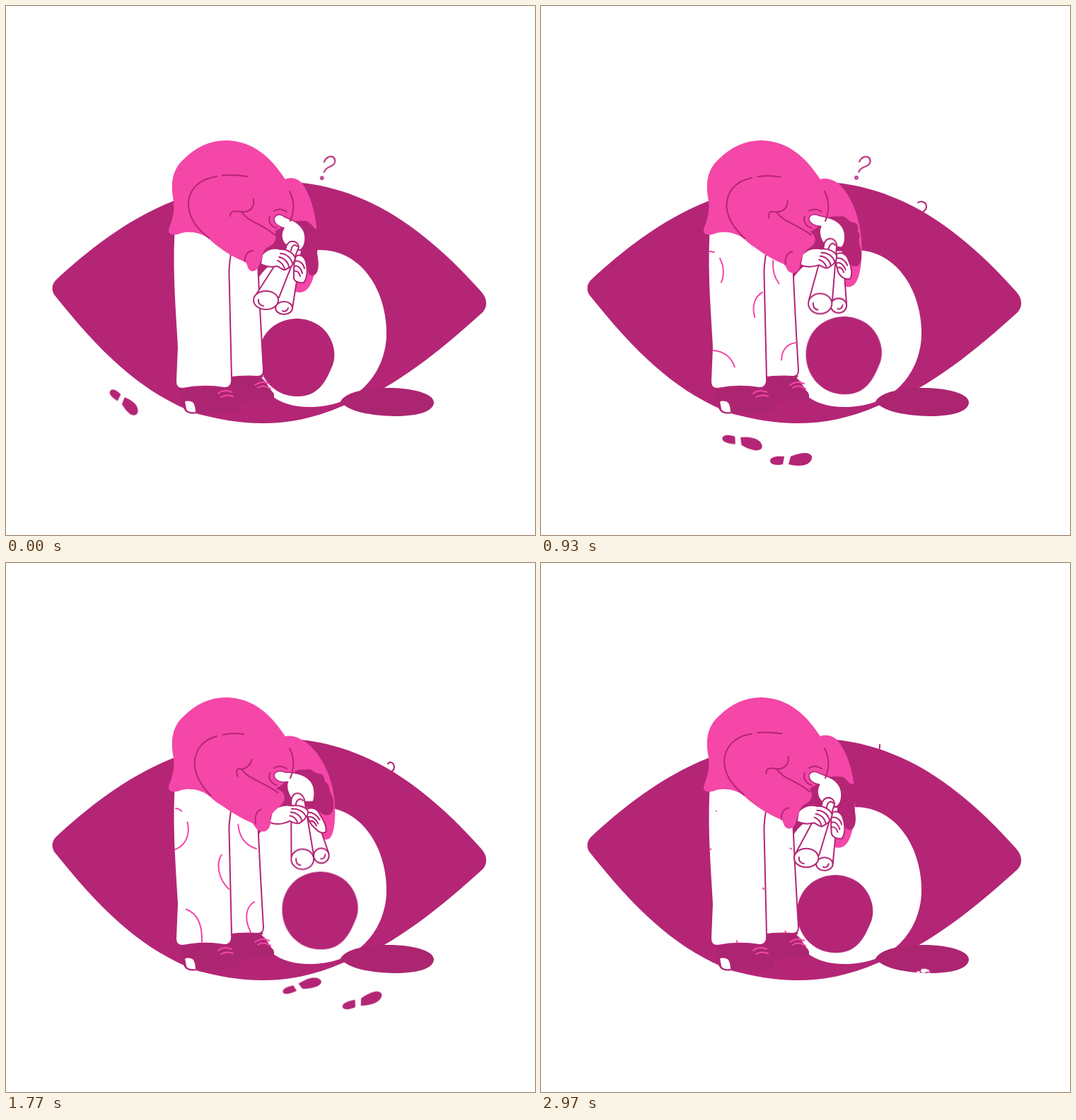
Recreate the animation shown at these times as an HTML page. Size 748 by 748 pixels, loop 3010 ms.

```html
<!DOCTYPE html>
<html lang="en">
<head>
<meta charset="utf-8">
<title>Searching eye</title>
<style>
:root { --dark: #b42576; --deep: #ac2571; --pink: #f447a8; --loop: 3010ms linear infinite; }
html, body { margin: 0; width: 100%; height: 100%; overflow: hidden; background: #fff; }
svg { display: block; width: 100vw; height: 100vh; }

.dark { fill: var(--dark); }
.deep { fill: var(--deep); }
.pink { fill: var(--pink); }
.white { fill: #fff; }
.ink { stroke: var(--dark); }
.line { fill: none; stroke: var(--dark); }
.lace { fill: none; stroke: var(--pink); }
svg { stroke-width: 2; stroke-linecap: round; stroke-linejoin: round; }

/* Parts that follow the gaze blend between two outlines */
.morph { d: var(--a); animation: morph var(--loop); }
@keyframes morph { 0%, 100% { d: var(--a); } 74%, 89% { d: var(--b); } }

.pupil { animation: look var(--loop); }
@keyframes look { 0%, 100% { transform: none; } 74%, 89% { transform: translate(42px, -7px); } }

.swing { transform-origin: 0 335px; animation: swing var(--loop); }
@keyframes swing {
  0%, 74%, 89%, 100% { transform: none; }
  15%, 42% { transform: scaleY(1.06); }
  59% { transform: scaleY(1.035); }
  96% { transform: scaleY(1.035); }
}

.crease { stroke-dasharray: 1 3; animation: trace var(--loop); }
@keyframes trace {
  0% { stroke-dashoffset: 1.01; }
  50% { stroke-dashoffset: 0; }
  100% { stroke-dashoffset: -1; }
}

.step { opacity: 0; animation: step var(--loop) var(--at, 0ms); }
.step.first { animation-name: first; }
@keyframes step { 0%, 20.2% { opacity: 1; } 20.21%, 100% { opacity: 0; } }
@keyframes first { 0%, 16.6% { opacity: 1; } 16.61%, 100% { opacity: 0; } }

.ask { animation: tilt var(--loop), ask var(--loop); }
@keyframes tilt {
  0% { transform: translate(456px, 226px) rotate(28deg); }
  8% { transform: translate(456px, 226px) rotate(46deg); }
  15.6% { transform: translate(456px, 226px) rotate(40deg); }
  30.9% { transform: translate(456px, 226px) rotate(31deg); }
  42.2%, 100% { transform: translate(456px, 226px) rotate(14deg); }
}
@keyframes ask { 0%, 50% { opacity: 1; } 50.01%, 100% { opacity: 0; } }

.ask2 { animation: drift var(--loop), ask2 var(--loop); }
@keyframes drift { 0%, 31% { d: var(--a); } 42%, 100% { d: var(--b); } }
@keyframes ask2 { 0%, 22% { opacity: 0; } 22.01%, 63% { opacity: 1; } 63.01%, 100% { opacity: 0; } }

.ray { stroke-dasharray: 1 2; animation: ray var(--loop); }
@keyframes ray {
  0%, 64% { stroke-dashoffset: 1.05; }
  71%, 99.9% { stroke-dashoffset: 0; }
  100% { stroke-dashoffset: 1.05; }
}

.fist { animation: reach var(--loop); }
@keyframes reach {
  0%, 60% { transform: translate(36px, 40px); }
  72%, 89% { transform: none; }
  100% { transform: translate(33px, 37px); }
}
.tail { animation: tail var(--loop); }
@keyframes tail { 0%, 60%, 88%, 100% { transform: translate(-8px, -18px); } 70%, 80% { transform: none; } }
</style>
</head>
<body>
<svg viewBox="0 0 748 748">
  <defs>
    <path id="shade" d="M473 559C480 546 510 540 540 540C572 540 605 547 605 561C604 574 580 580 550 580C515 579 484 574 473 559Z"/>
    <clipPath id="inShade"><use href="#shade"/></clipPath>
    <path id="foot" d="M-29 2C-29-4-18-5-9-4L-11 7C-19 9-29 8-29 2ZM0-4C6-7 14-9 22-9C29-8 31-4 30-1C28 6 20 9 12 9C6 9 1 8-3 7Z"/>
  </defs>

  <!-- Eye -->
  <path class="dark" d="M70 388C112 349 168 303 236 276L418 250C510 260 590 312 672 404C681 414 681 425 674 433C632 471 584 512 533 541L475 566C435 583 400 590 362 590C330 590 300 584 272 577C190 547 132 488 68 408C64 400 65 394 70 388Z"/>
  <path class="white" d="M443 345C505 345 538 405 538 463C538 508 508 567 428 567C385 567 355 545 350 500L350 400C360 365 400 345 443 345Z"/>
  <path class="dark pupil" d="M410 442C431 442 450 452 459 471C466 486 466 500 460 512C453 529 442 552 413 552C381 553 357 527 357 496C357 465 380 443 410 442Z"/>
  <path class="dark tail" d="M562 579C568 584 558 585 567 589C572 588 576 583 578 575L570 572Z"/>
  <use class="deep" href="#shade"/>
  <g clip-path="url(#inShade)">
    <g class="fist">
      <path class="white ink" stroke-width="1.6" d="M508 541C514 539 521 541 522 546C525 558 532 570 542 581L548 595L520 590L519 574C512 577 506 573 504 569C497 569 495 563 499 560C496 556 497 551 501 550C499 545 503 543 507 544Z"/>
      <path class="line" stroke-width="1.6" d="M501 550L509 557M499 560L513 564M504 569L517 567M507 544L511 553M522 546C515 545 511 548 513 552L517 556"/>
    </g>
  </g>

  <!-- Marks and footprints -->
  <g class="ask line">
    <path d="M-8-2C-9-9-5-14 0-14C5-13 7-8 5-4C3 1-2 2-1.500 11"/>
    <circle cy="19.6" r="1.8"/>
  </g>
  <path class="line ask2" style="--a:path('M533 278C538 275 545 277 545 284C544 290 540 292 535 291');--b:path('M540 284C543 279 549 283 549 289C548 295 543 296 538 297')"/>
  <path class="line ray" pathLength="1" d="M477.500 280L479 257"/>
  <g class="dark">
    <g class="step first"><use href="#foot" transform="translate(166 560) rotate(36) scale(.84 -.9)"/></g>
    <g class="step" style="--at:300ms"><use href="#foot" transform="translate(206 618) rotate(49)"/></g>
    <g class="step" style="--at:600ms"><use href="#foot" transform="translate(284 617) rotate(8) scale(.97 -.95)"/></g>
    <g class="step" style="--at:900ms"><use href="#foot" transform="translate(353 641)"/></g>
    <g class="step" style="--at:1220ms"><use href="#foot" transform="translate(418 599) rotate(-20) scale(.95 -.8)"/></g>
    <g class="step" style="--at:1590ms"><use href="#foot" transform="translate(503 619) rotate(-14) scale(.98 .9)"/></g>
  </g>

  <!-- Shoes and trousers -->
  <path class="deep" d="M318 520L362 522C367 530 370 538 378 547C381 553 378 558 370 558L325 560Z"/>
  <path class="deep" d="M246 538L318 535C328 542 332 555 329 574L270 576C256 578 251 573 250 563Z"/>
  <path class="white ink" d="M252 559C256 556 264 558 266 561C268 565 269 570 269 575C263 576 256 575 254 570Z"/>
  <path class="lace" d="M300 548C306 543 312 543 319 546M304 553C309 550 315 550 321 552M352 536C359 531 366 531 372 534M356 540C361 536 367 537 374 541"/>
  <path class="white" d="M361 525L364 525L367 532Z"/>
  <path class="white ink" d="M306 345L356 360C358 410 361 465 364 515C364 521 361 524 356 524C344 523 325 524 310 526Z"/>
  <path class="white ink" d="M238 312C234 370 239 430 242 482L240 530C240 538 243 541 250 541C270 537 290 537 309 540C316 540 320 535 319 526L315.500 380C315 365 317 358 319 345L300 325Z"/>
  <g class="lace">
    <path class="crease" pathLength="1" d="M238 347C242 347 246 348 248 351"/>
    <path class="crease" pathLength="1" d="M253 357C262 374 259 398 239 405"/>
    <path class="crease" pathLength="1" d="M313 405C296 414 296 442 315 461"/>
    <path class="crease" pathLength="1" d="M243 487C268 489 278 508 277 536"/>
    <path class="crease" pathLength="1" d="M328 360C327 382 335 398 354 404"/>
    <path class="crease" pathLength="1" d="M361 476C341 478 334 499 346 522"/>
  </g>

  <!-- Jacket and head -->
  <path class="pink morph" style="--a:path('M393 246C400 241 412 243 418 250C430 266 437 290 440 320C442 350 438 385 428 398C420 408 410 406 405 400L395 300Z');--b:path('M393 246C402 242 418 248 430 258C452 275 468 308 471 340C473 365 471 385 464 388C458 389 455 384 452 380L400 300Z')"/>
  <path class="pink" d="M231 313C237 297 239 286 236 270C232 245 238 228 252 216C268 200 288 190 312 190C350 191 376 215 396 247L408 262L405 300L383 320L340 355C320 350 300 343 288 330C276 320 260 318 248 321C240 325 226 325 231 313Z"/>
  <path class="dark morph" style="--a:path('M381 318L392 312L404 303C410 306 414 302 420 304C428 302 432 310 437 315C447 314 448 322 444 328C447 336 439 342 440 350C443 365 443 379 434 381C425 381 429 372 424 366L412 350L384 342Z');--b:path('M376 322L398 310L408 294C414 286 420 291 426 289C434 286 436 294 442 293C451 294 451 301 453 305C462 306 460 315 465 321C471 330 470 348 462 350C452 352 448 345 440 342L420 340L400 338Z')"/>
  <path class="white ink morph" stroke-width="1.5" style="--a:path('M379 302C379 296 386 293 392 297C400 302 412 303 420 316C425 326 424 340 415 346L395 337C388 330 389 320 393 314C386 312 380 308 379 302Z');--b:path('M379 300C380 293 390 293 396 296C408 294 430 297 437 312C440 318 440 330 439 335L410 338C402 328 397 316 400 308C390 311 380 308 379 300Z')"/>

  <!-- Binoculars and hands -->
  <g class="swing">
    <path class="white ink morph" style="--a:path('M400 345L418 345L405 427L381 427Z');--b:path('M424 345L438 345L470 404L450 412Z')"/>
    <path class="white ink morph" style="--a:path('M381 427a12 9 0 1 0 24 0a12 9 0 1 0 -24 0Z');--b:path('M449 407a10.5 10.5 0 1 0 21 0a10.5 10.5 0 1 0 -21 0Z')"/>
    <path class="line morph" style="--a:path('M391 431C394 433 398 431 399 427');--b:path('M459 411C462 412 465 409 465 405')"/>
  </g>
  <path class="white ink morph" style="--a:path('M410 354C415 350 422 354 424 362C427 372 426 385 421 391C415 392 408 390 407 385C407 375 406 362 410 354Z');--b:path('M430 346C438 343 446 346 450 356C457 365 461 372 460 378C453 382 447 374 440 368C434 364 428 352 430 346Z')"/>
  <path class="line morph" style="--a:path('M409 361C415 359 421 365 422 371M408 368C413 366 418 372 419 378M408 375C412 374 415 378 416 382');--b:path('M431 351C438 350 445 354 449 361M432 357C438 355 444 360 447 366M435 363C439 361 442 363 445 369')"/>
  <g class="swing">
    <path class="white ink morph" style="--a:path('M396 342C397 330 413 330 414 341L386 412L368 418L351 412Z');--b:path('M405 338C404 321 420 320 424 333L448 412L432 418L417 412Z')"/>
    <path class="white ink morph" style="--a:path('M350 416a17.500 13 0 1 0 35 0a17.500 13 0 1 0 -35 0Z');--b:path('M417 416a15.500 14 0 1 0 31 0a15.500 14 0 1 0 -31 0Z')"/>
    <path class="line morph" style="--a:path('M357 415C356 420 360 424 364 424');--b:path('M424 415C423 420 426 424 430 424')"/>
    <path class="line morph" style="--a:path('M403 346C404 338 409 336 412 340');--b:path('M411 344C411 334 418 330 422 335')"/>
  </g>
  <path class="white ink morph" style="--a:path('M362 352C368 344 378 341 388 344C398 343 408 351 409 357C408 362 406 364 405 366C403 370 399 370 395 373C392 375 388 369 383 368C373 370 366 368 360 365Z');--b:path('M380 350C388 344 396 341 408 343C418 341 428 344 431 348C433 354 431 356 429 358C427 362 424 364 421 366C417 369 410 366 406 364C396 369 386 372 376 367Z')"/>
  <path class="line morph" style="--a:path('M388 350C396 350 403 356 405 364M386 355C393 356 399 362 400 369M384 360C389 362 393 367 394 372');--b:path('M408 347C417 346 426 350 429 357M407 352C414 351 421 356 423 363M406 357C411 357 416 361 417 367')"/>

  <!-- Sleeve and folds -->
  <path class="pink morph" style="--a:path('M284 326L300 300L365 309L378 320C384 326 382 337 370 341C362 346 364 354 358 366C355 376 346 378 342 370C341 366 340 363 338 362C318 354 300 342 284 326Z');--b:path('M284 324L305 300L365 311L388 321C399 326 400 335 392 344C384 352 374 356 378 368C378 381 366 385 357 377C354 374 354 372 350 369C326 358 302 342 284 324Z')"/>
  <g class="line">
    <path class="morph" style="--a:path('M298 241C270 245 257 262 258 283C260 304 273 317 287 328');--b:path('M298 246C278 252 268 268 269 288C271 304 280 318 290 329')"/>
    <path class="morph" style="--a:path('M306 239.500C318 238.500 330 239.500 341 241');--b:path('M307 243.500C316 241 326 241 335 242.500')"/>
    <path class="morph" style="--a:path('M317 297C317 288 326 290 333 291C344 292 352 286 350 273M333 291C344 307 360 306 379 323');--b:path('M330 303C326 291 329 290 333 292C339 290 344 286 347 279M333 292C344 306 362 309 386 325')"/>
    <path class="morph" style="--a:path('M338 361C337 353 342 346 349 346');--b:path('M357 371C355 360 357 352 364 349')"/>
    <path d="M401 262C408 276 408 290 402 304M379 290C384 286 392 287 397 291M373 297C370 305 375 312 383 314"/>
  </g>
</svg>
</body>
</html>
```
